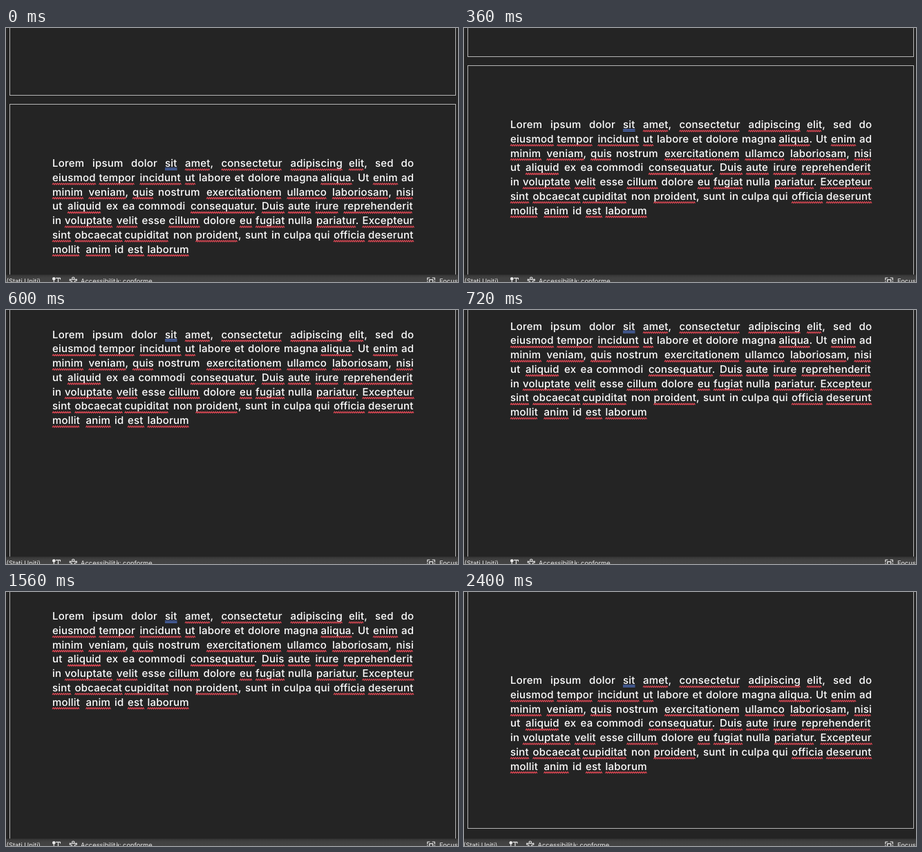
These frames come from a looping animation (654 by 368 pixels, 2640 ms). An HTML page:

```html
<!DOCTYPE html>
<html lang="it">
<head>
<meta charset="utf-8">
<title>Document scroll</title>
<style>
  html, body { margin: 0; width: 100%; height: 100%; overflow: hidden; background: #242424; }
  svg { display: block; width: 654px; height: 368px; }
  text { font-family: Inter, "Open Sans", sans-serif; text-rendering: geometricPrecision; white-space: pre; }
  #words text { font-size: 15px; font-weight: 500; letter-spacing: .2px; fill: #fff; }
  #bar text { font-size: 9.4px; fill: #e8e8e8; }
  .page { fill: none; stroke: #b4b4b4; }
  .wave { fill: none; stroke: #dc4753; stroke-width: 1.25; }
  .double { fill: none; stroke: #5478d2; stroke-width: 1.2; }
  .icon { fill: none; stroke: #e8e8e8; stroke-width: 1.2; stroke-linecap: round; stroke-linejoin: round; }
  .dot { fill: #e8e8e8; }
</style>
</head>
<body>
<svg viewBox="0 0 654 368">
  <defs>
    <clipPath id="view"><rect width="654" height="357.5"/></clipPath>
    <linearGradient id="shade" x2="0" y2="1">
      <stop offset="0" stop-color="#353535"/>
      <stop offset=".4" stop-color="#414141"/>
      <stop offset="1" stop-color="#454545"/>
    </linearGradient>
  </defs>
  <rect width="654" height="368" fill="#242424"/>
  <g clip-path="url(#view)">
    <g id="doc">
      <g id="upper">
        <rect class="page" x="5.5" y="-814.5" width="645" height="912"/>
        <rect class="page" x="5.5" y="110.5" width="645" height="912"/>
      </g>
      <g id="lower">
        <rect class="page" x="5.5" y="-501.5" width="645" height="912"/>
      </g>
      <g id="words"></g>
    </g>
  </g>
  <g id="bar">
    <rect y="357.5" width="654" height="11" fill="url(#shade)"/>
    <g id="status">
      <text x=".5" y="369.8">(Stati Uniti)</text>
      <circle class="dot" cx="69.3" cy="363.2" r="2.3"/>
      <path class="icon" d="M69.3 364V370M72.5 362.3H78.5V364M75.5 362.3V370"/>
      <circle class="icon" cx="97.3" cy="362.7" r="1.7"/>
      <path class="icon" d="M95 364.6L92.3 364.2V366L95.4 367V370M99.6 364.6L102.3 364.2V366L99.2 367V370"/>
      <text x="108" y="369.8">Accessibilità: conforme</text>
    </g>
    <path class="icon" d="M609.8 365V362H613M617 362H620.3V365M609.8 367V370M620.3 367V370"/>
    <rect class="icon" x="612.6" y="364.6" width="5" height="5"/>
    <text x="627" y="369.8">Focus</text>
  </g>
</svg>
<script>
  // Each word is followed by its left edge; * marks a spelling wave, = a double line.
  const lines = [
    "Lorem 67 ipsum 125 dolor 181 =sit 230 *amet, 259 *consectetur 311.5 *adipiscing 411.5 *elit, 496 sed 534 do 571.5",
    "*eiusmod 67 *tempor 134.5 *incidunt 193.5 *ut 259 labore 279 et 330.5 dolore 350 magna 402 *aliqua. 455.5 Ut 509 *enim 531 ad 572",
    "*minim 67 *veniam, 119.5 *quis 183 nostrum 220 *exercitationem 290 *ullamco 406.5 *laboriosam, 472 *nisi 564.5",
    "ut 67 *aliquid 89 ex 145 ea 168.5 commodi 191.5 *consequatur. 267 *Duis 370 *aute 408 *irure 447.5 *reprehenderit 488.5",
    "in 67 *voluptate 85 *velit 160 esse 196.5 *cillum 235.5 dolore 285.5 *eu 338 *fugiat 361 nulla 408 *pariatur. 449 *Excepteur 515.5",
    "*sint 67 *obcaecat 99.5 *cupiditat 171.5 non 242 *proident, 274.5 sunt 346 in 384 culpa 401.5 qui 446 *officia 474 *deserunt 524",
    "*mollit 67 *anim 115.5 id 157 *est 176 *laborum 204.5"
  ];
  const byId = id => document.getElementById(id);
  const words = byId("words");

  function add(tag, attrs) {
    const el = document.createElementNS("http://www.w3.org/2000/svg", tag);
    for (const key in attrs) el.setAttribute(key, attrs[key]);
    return words.appendChild(el);
  }

  function addWord(raw, x, y) {
    const text = raw.replace(/^[*=]/, "");
    const label = add("text", { x, y });
    label.textContent = text;
    if (raw === text) return;
    const length = label.getSubStringLength(0, text.replace(/[.,]$/, "").length);
    if (raw[0] === "=") {
      add("path", { class: "double", d: `M${x} ${y + 2}h${length}m${-length} 2.2h${length}` });
    } else {
      const zigzag = "l1.5 -2l1.5 2".repeat(Math.round(length / 3));
      add("path", { class: "wave", d: `M${x} ${y + 5}${zigzag}` });
    }
  }

  lines.forEach((line, row) => {
    const parts = line.split(" ");
    for (let i = 0; i < parts.length; i += 2) {
      addWord(parts[i], +parts[i + 1], 201.2 + row * 20.72);
    }
  });

  // Height of the first text line at each step.
  const STEP = 120, LOOP = 2640;
  const heights = [
    196, 194.5, 190.5, 140, 72, 35.5, 23.5, 29, 39, 36, 32,
    32.5, 33.5, 35, 35.5, 140, 138, 135, 132, 129.5, 128
  ];
  const LOWER_FROM = 15, SHIFT_FROM = 16;

  function draw(now) {
    const step = Math.min(Math.floor((now % LOOP) / STEP), heights.length - 1);
    const low = step >= LOWER_FROM;
    byId("doc").setAttribute("transform", `translate(0 ${heights[step] - 196})`);
    byId("upper").style.display = low ? "none" : "";
    byId("lower").style.display = low ? "" : "none";
    byId("status").setAttribute("transform", `translate(${step >= SHIFT_FROM ? -1.5 : 0} 0)`);
  }

  const start = performance.now();
  function tick() {
    draw(performance.now() - start);
    requestAnimationFrame(tick);
  }
  tick();
</script>
</body>
</html>
```
